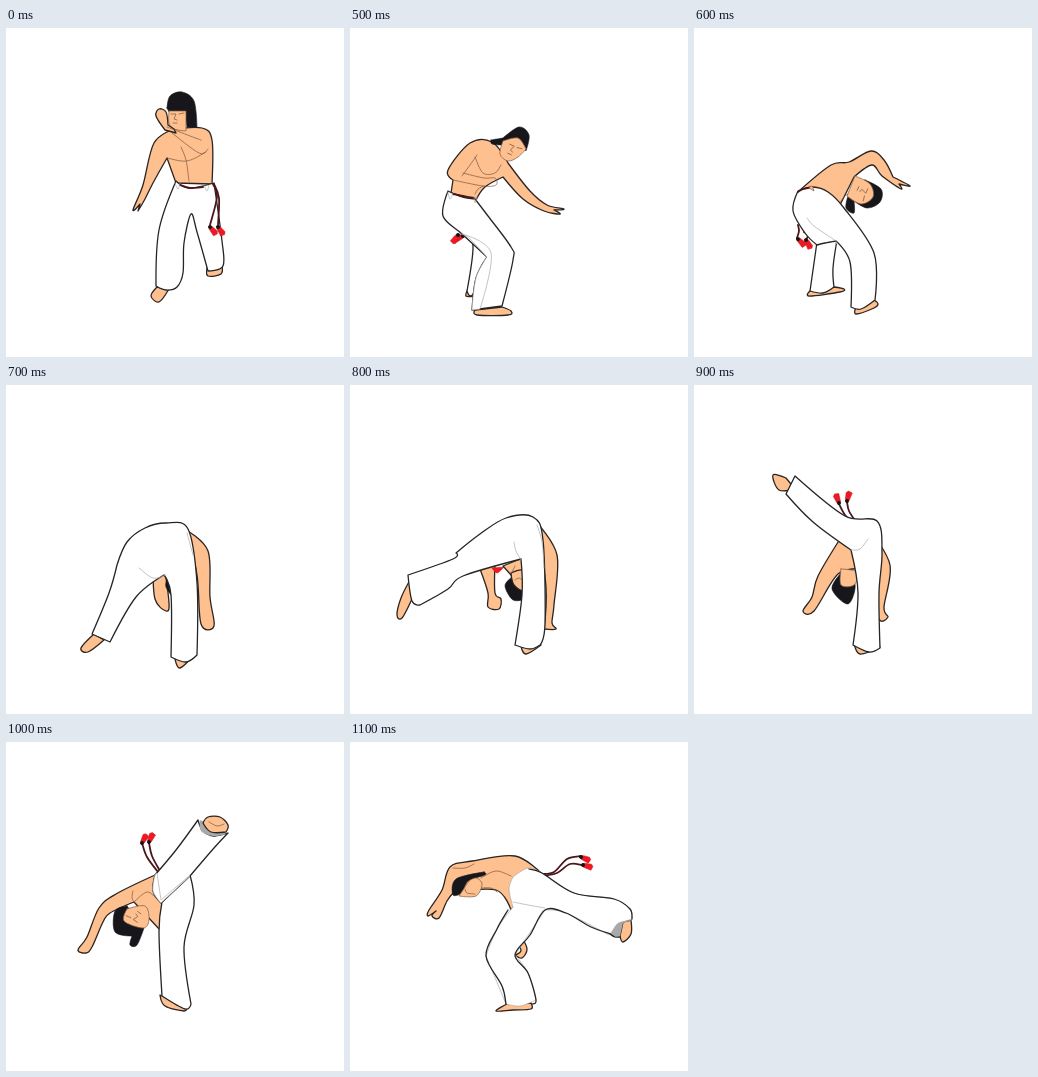
Animation, 338 px wide and 329 px high, one loop 1.2 s. Source, as an HTML page:

```html
<!DOCTYPE html>
<html lang="en">
<head>
<meta charset="utf-8">
<title>Spinning kick</title>
<style>
html, body { margin: 0; width: 100%; height: 100%; overflow: hidden; background: #fff; }
svg { display: block; width: 338px; height: 329px; }
path { fill: none; stroke-linecap: round; stroke-linejoin: round; }
.skin { fill: #fdc08e; stroke: #2b2422; stroke-width: 1.3; }
.face { fill: #fdc08e; stroke: #80573f; stroke-width: .7; }
.white { fill: #fff; stroke: #252525; stroke-width: 1.3; }
.cloth { fill: #fff; stroke: #aaa; stroke-width: .7; }
.hair { fill: #17171b; stroke: #17171b; stroke-width: .6; }
.red { fill: #f01923; stroke: #c5161d; stroke-width: .5; }
.shade { fill: #a9a9a9; }
.edge { stroke: #252525; stroke-width: 1.3; }
.fine { stroke: #80573f; stroke-width: .7; }
.fold { stroke: #aaa; stroke-width: .7; }
.belt { stroke: #4c151b; stroke-width: 1.8; }
</style>
</head>
<body>
<svg id="stage" viewBox="0 0 338 329"></svg>
<script>
const LOOP = 1200, HOLD = 500, STEP = 100;
const stage = document.getElementById("stage");

// Smooth curve through the points; "!" marks a sharp corner.
function curve(text, open) {
  const pts = text.split(" ").map(s => ({ p: s.replace("!", "").split(",").map(Number), sharp: s.endsWith("!") }));
  const n = pts.length;
  const at = i => pts[open ? Math.max(0, Math.min(n - 1, i)) : (i + n) % n];
  const handle = (i, side) => at(i).p.map((v, k) =>
    at(i).sharp ? v : v + side * (at(i + 1).p[k] - at(i - 1).p[k]) / 6);
  let d = "M" + pts[0].p;
  for (let i = 0; i < (open ? n - 1 : n); i++)
    d += `C${handle(i, 1)} ${handle(i + 1, -1)} ${at(i + 1).p}`;
  return open ? d : d + "Z";
}

let out = "";
const part = (style, open) => text => { out += `<path class="${style}" d="${curve(text, open)}"/>`; };
const [skin, face, white, cloth, hair, red, shade] =
  ["skin", "face", "white", "cloth", "hair", "red", "shade"].map(s => part(s, false));
const [edge, fine, fold, belt] = ["edge", "fine", "fold", "belt"].map(s => part(s, true));

const place = (x, y, turn, body) => { out += `<g transform="translate(${x} ${y}) rotate(${turn})">${body}</g>`; };
const features = (x, y, turn) =>
  place(x, y, turn, '<path class="fine" d="M-5-3h5l-2 5 3 1M3-3l5-1M-3 6h4"/>');
const tassel = (x, y, turn) =>
  place(x, y, turn, '<path class="red" d="M1-2 8-3 10-1 9 3 1 2Z"/><circle r="2" fill="#171315"/>');

function guard() {
  skin("201,240! 202,248 215,246 216,237!");
  skin("151,259! 145,268 153,274 163,261!");
  skin("170,155! 161,130! 147,155 139,171 132,183! 134,176! 127,182 137,157 148,115 168,101! 196,100 206,112 206,156!");
  hair("161,80! 164,68 176,64 188,73 191,99! 181,99! 179,84! 163,84!");
  face("163,83! 180,83! 180,103! 168,101 163,95");
  features(170, 89, 0);
  skin("162,97! 160,84 153,81 150,88 159,102! 170,105! 168,101!");
  fine("161,99 184,108 195,112");
  fine("166,105 193,125 202,121");
  fine("161,130 181,133 200,124");
  fine("175,119 180,132 183,153");
  white("170,153! 153,202 150,258! 160,262 171,259 177,245 178,215 185,186 191,204 202,243! 217,238 216,213 208,155! 183,160");
  belt("174,157 184,160 197,159");
  fold("169,155 172,161 174,155");
  fold("198,157 201,163 203,157");
  belt("207,156 211,169 204,197");
  belt("208,156 213,170 212,197");
  tassel(204, 199, 50);
  tassel(212, 199, 55);
}

function lean() {
  skin("118,261! 116,268 124,268!");
  skin("125,282! 127,287 158,287 161,283 152,279!");
  tassel(113, 208, 155);
  tassel(108, 207, 125);
  white("114,205! 123,218 117,263! 123,266 140,230!");
  skin("101,165! 103,152! 98,142 120,115 142,114 158,135! 180,163 197,177 214,181 204,182! 210,186 194,183 173,171 153,149! 135,159 126,172!");
  hair("141,112! 153,110! 169,99 179,107 176,123! 168,113! 152,117! 142,116");
  face("153,113! 168,110 176,121! 168,129 158,133 150,126");
  features(163, 121, 25);
  fine("127,127 120,137 112,148");
  fine("125,129 133,145 145,145 151,137");
  fine("103,152 133,158 146,157 145,150 134,150 113,145");
  fine("125,166 128,161 134,158");
  white("98,163! 93,188 112,206 137,229! 126,250 122,282! 152,278! 163,232 161,219 138,188 125,171! 112,169");
  cloth("112,206! 120,211 137,229! 126,250 122,282! 130,281! 141,225");
  belt("103,166 113,168 124,170");
  fold("98,164 100,171 103,165");
  fold("124,169 125,175 127,169");
}

function bend() {
  skin("117,262! 115,268 146,264 150,261 140,259!");
  skin("162,279! 162,286 180,280 184,276 180,272!");
  belt("104,197 105,203 103,210");
  belt("110,204 114,207 112,212");
  white("123,214! 116,263! 129,265 140,259! 139,240 143,212!");
  skin("105,163! 137,137 155,134 177,123 190,132 199,149! 216,158 205,156! 207,161 188,148 178,137 160,149! 146,177! 121,160");
  hair("171,152! 187,161 186,174 173,180 160,173! 160,185 152,180 154,168! 161,164!");
  face("161,148! 176,156 179,169 167,176 153,168!");
  features(169, 164, 115);
  fine("145,176 150,169 154,166");
  white("104,163! 99,183 111,205 123,217! 131,215 142,213! 156,234 157,279! 167,281 181,272! 180,225 150,180 134,164 119,159");
  shade("142,213! 141,216! 144,216!");
  fold("113,190 120,198 142,213");
  belt("104,164 109,161 115,160");
  face("115,160! 118,158 120,163!");
  tassel(104, 211, 45);
  tassel(112, 212, 60);
}

function dive() {
  skin("88,249! 75,263 82,267 98,255!");
  skin("169,274! 174,283 188,270!");
  skin("180,145! 202,166 204,212 208,241 195,239 191,190");
  skin("147,180! 149,214 160,226 163,218 157,180");
  hair("163,190! 160,202 173,216 182,195");
  face("165,178! 163,194 178,199 181,180");
  tassel(133, 195, 90);
  white("111,180! 121,157 139,143 160,138 182,144 191,198 191,270! 180,277 165,272! 165,210 158,190! 130,212 104,257! 86,249! 103,208");
  fold("133,183 147,193 160,190");
  fold("181,148 187,170");
}

function invert() {
  skin("60,195! 51,213 47,230 52,233 62,214!");
  skin("171,261! 176,269 191,260!");
  skin("187,138! 207,170 204,220 202,238 206,244 194,244! 196,202");
  skin("130,184! 138,208 138,222 149,224 151,214 145,208 145,178!");
  red("142,183! 147,188 154,182!");
  skin("153,181! 175,172! 174,205! 161,190");
  hair("161,193! 155,201 163,215 176,214! 174,205");
  skin("161,188! 164,200 174,205 174,186");
  fine("165,195 169,193 172,195");
  fine("165,181 163,185 161,188");
  white("106,168! 130,149 156,133 183,132 193,155 195,239 190,260! 180,264 165,260! 172,210 171,174! 113,191 98,204 70,220! 62,216 58,190! 103,174");
  fold("164,157 166,166 171,175");
  fold("187,140 192,157 194,183");
}

function rise() {
  skin("92,93! 79,90 85,105 101,104!");
  skin("160,258! 166,269 186,262!");
  skin("176,146! 196,180 190,222 194,232 184,232 177,180");
  skin("146,154! 124,191 118,212 109,226 120,226 144,189 170,180");
  hair("147,188! 138,204 154,219 161,199");
  face("147,184! 147,200 160,200 163,187");
  belt("160,139 151,130 145,119");
  belt("162,137 155,126 153,117");
  tassel(145, 118, -110);
  tassel(153, 116, -75);
  white("101,91! 151,131 183,136 188,168 185,208 186,263! 175,267 159,260! 164,208 157,165! 119,137 92,109!");
  fold("157,165 166,164 174,154");
}

function kick() {
  skin("154,253! 159,264 178,269 181,265!");
  belt("152,130 141,115 136,101");
  belt("154,129 146,114 143,101");
  tassel(136, 101, -62);
  tassel(143, 100, -65);
  skin("149,133! 110,152 93,166 81,195 72,208 80,211 86,205 97,180 104,171 128,160! 154,188! 160,162!");
  fine("128,160 141,150 151,157");
  fine("127,149 126,156 129,161");
  hair("121,164! 109,169 109,190 126,194! 124,203 131,203 138,186!");
  face("121,167! 139,164 143,178 137,186 118,179");
  features(129, 175, -145);
  white("156,160! 153,190 156,254! 179,267 185,262! 178,205 188,163 184,133!");
  white("149,133! 170,108 192,78! 197,89 208,94 222,91! 208,106 184,134! 155,161! 147,149");
  cloth("149,133! 151,131! 155,158! 183,134! 184,134! 155,161! 147,149");
  shade("194,78! 195,89 207,94 220,92! 209,85");
  skin("197,81! 202,75 214,75 222,83 220,90! 205,90");
  fine("203,80 211,84 218,82");
}

function land() {
  belt("192,132 204,130 217,117 231,114");
  belt("192,134 207,131 220,122 232,123");
  tassel(231, 115, 22);
  tassel(233, 123, 15);
  skin("163,197! 171,194! 177,207 172,216 165,213! 171,208");
  skin("157,262! 146,269 163,268 181,267 181,261!");
  skin("273,180! 281,178! 281,192 273,200 270,194!");
  skin("191,131! 165,114 122,119 100,125 92,148 79,168 78,174 86,169! 82,174 89,176 97,159 104,150! 146,148 161,168!");
  hair("134,130! 106,137 103,153 113,151! 118,139 135,133");
  face("119,139! 126,136 132,142 126,154 109,154!");
  fine("115,147 117,151 125,152");
  fine("131,136 146,129 161,134");
  fine("132,146 141,146 147,150");
  fine("103,126 115,126 124,122");
  cloth("163,135! 178,126 192,131! 224,151 264,157 280,167 282,177! 270,182 259,193! 216,171 195,168! 165,213! 178,231 186,258! 170,264 156,262! 136,214! 147,187 163,165! 159,147");
  edge("179,127 192,131 224,151 264,157 280,167 282,177");
  edge("261,192 241,185 216,171 195,168 180,193 165,213 178,231 186,258 182,262");
  edge("156,262 152,244 136,214 147,187 158,168");
  fold("163,160 178,163 195,166");
  shade("282,178! 268,181 260,193! 270,195! 273,181!");
  edge("260,192 265,195 270,195");
}

for (const pose of [guard, lean, bend, dive, invert, rise, kick, land]) {
  out = "";
  pose();
  stage.innerHTML += `<g>${out}</g>`;
}
const groups = [...stage.children];

function draw(ms) {
  const t = ms % LOOP;
  const now = t < HOLD ? 0 : 1 + Math.floor((t - HOLD) / STEP);
  groups.forEach((g, i) => { g.style.display = i === now ? "" : "none"; });
}

const start = performance.now();
function tick() {
  draw(performance.now() - start);
  requestAnimationFrame(tick);
}
draw(0);
requestAnimationFrame(tick);
</script>
</body>
</html>
```
